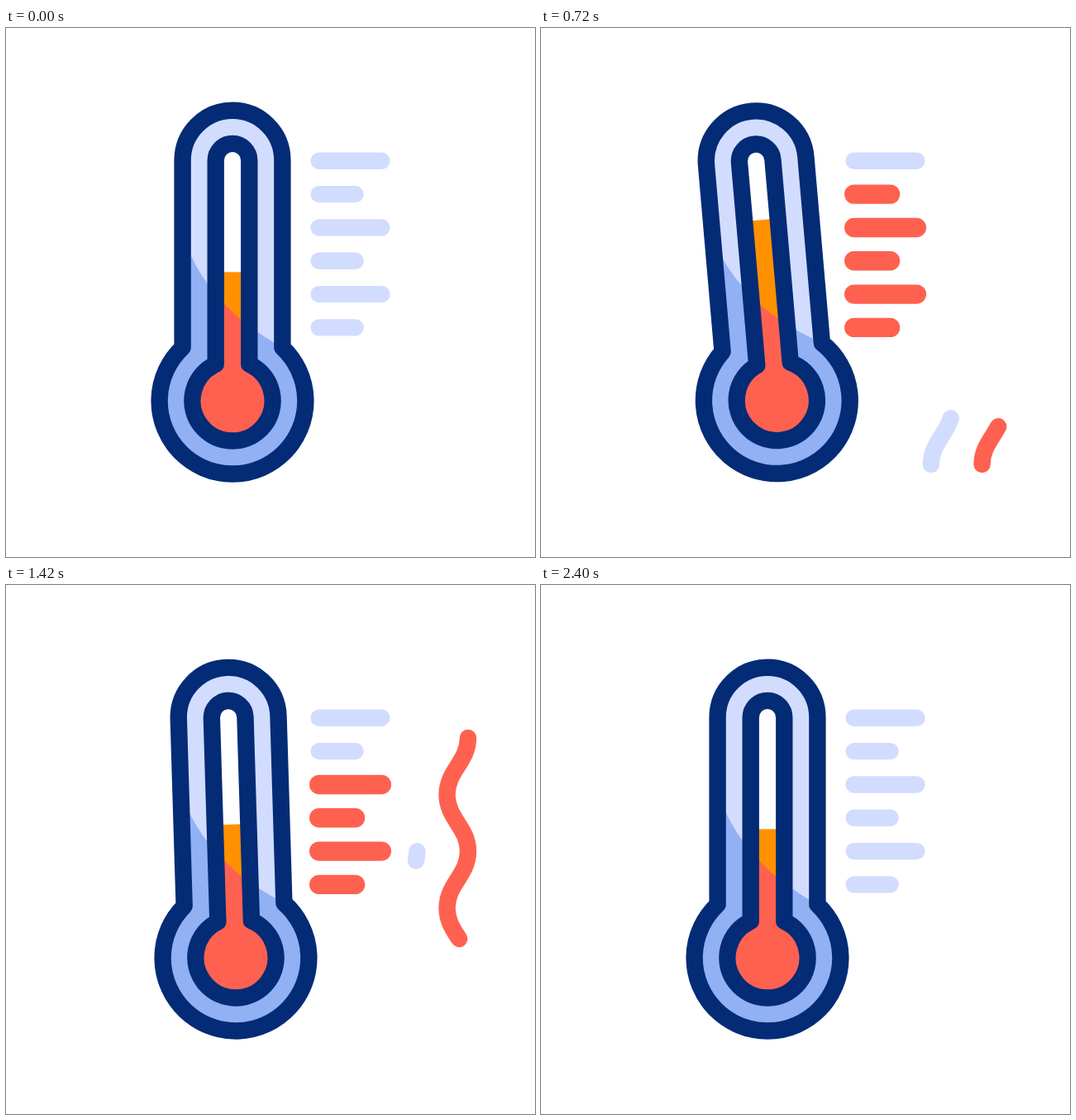
These frames come from a looping animation (640x640 px, 2.42 s). An HTML page:

```html
<!DOCTYPE html>
<html lang="en">
<head>
<meta charset="utf-8">
<title>Thermometer</title>
<style>
  html, body { margin: 0; width: 100%; height: 100%; overflow: hidden; background: #fff; }
  svg { display: block; width: 100%; height: 100%; }
  .line { fill: none; stroke-width: 20.4; stroke-linecap: round; stroke-linejoin: round; }
  .navy { stroke: #042b76; }
  .pale { stroke: #d2dcfe; }
  .red { stroke: #ff6150; }
  .bar.red { stroke-width: 23.4; }
</style>
</head>
<body>
<svg viewBox="0 0 640 640">
  <defs>
    <path id="case" d="M213.6 386.6V160.2a60.4 60.4 0 0 1 120.8 0V386.6A88.4 88.4 0 1 1 213.6 386.6Z"/>
    <path id="tube" d="M253.7 406.8V160.2a20.3 20.3 0 0 1 40.6 0V406.8A48.6 48.6 0 1 1 253.7 406.8Z"/>
    <path id="shade" d="M213 253L223 274Q254 340 325 381L400 424V560H150V253Z"/>
    <clipPath id="inCase"><use href="#case"/></clipPath>
    <clipPath id="inTube"><use href="#tube"/></clipPath>
  </defs>
  <g id="bars"></g>
  <g id="waves"></g>
  <g id="thermo">
    <g clip-path="url(#inCase)">
      <use href="#case" fill="#d2dcfe"/>
      <use href="#shade" fill="#92b0f4"/>
    </g>
    <use href="#case" class="line navy"/>
    <g clip-path="url(#inTube)">
      <use href="#tube" fill="#ff9100"/>
      <use href="#shade" fill="#ff6150"/>
      <rect id="empty" x="250" y="130" width="48" height="165" fill="#fff"/>
    </g>
    <use href="#tube" class="line navy"/>
  </g>
</svg>
<script>
  const LOOP = 2420;
  const $ = id => document.getElementById(id);

  function add(parent, tag, attrs) {
    const el = document.createElementNS('http://www.w3.org/2000/svg', tag);
    for (const k in attrs) el.setAttribute(k, attrs[k]);
    return parent.appendChild(el);
  }

  // Eased value at time t through [time, value] keys
  function track(keys, t) {
    if (t <= keys[0][0]) return keys[0][1];
    for (let i = 1; i < keys.length; i++) {
      const [t0, v0] = keys[i - 1], [t1, v1] = keys[i];
      if (t < t1) {
        const x = (t - t0) / (t1 - t0);
        return v0 + (v1 - v0) * x * x * (3 - 2 * x);
      }
    }
    return keys[keys.length - 1][1];
  }

  const tilt = [[20, 0], [560, -12.7], [930, 6.7], [1260, -3.2], [1600, 0]];
  const level = [[40, 295.3], [455, 335], [840, 201], [1220, 335.5], [1600, 250.5], [2160, 295.3]];

  // Scale bars, bottom to top; they light upwards and go out downwards
  const bars = [];
  for (let i = 0; i < 6; i++) {
    const y = 362.4 - 40.32 * i;
    const line = { x1: 378.7, x2: i % 2 ? 454.4 : 422.6, y1: y, y2: y };
    bars.push({ el: add($('bars'), 'line', line), on: 480 + 60 * i, off: 1620 - 60 * i });
  }

  function wave(x, turns, color, head, tail) {
    const half = 68.6;
    let d = `M${x} 528`;
    for (let i = 0; i < turns; i++) {
      const s = i % 2 ? -25.4 : 25.4;
      d += `c0 -29 ${s} ${29 - half} ${s} ${-half}`;
    }
    const el = add($('waves'), 'path', { d, class: 'line ' + color, pathLength: 1 });
    return { el, head: [[head[0], 0], [head[1], 1]], tail: [[tail[0], 0], [tail[1], 1]] };
  }

  const waves = [
    wave(472, 3, 'pale', [530, 1080], [945, 1495]),
    wave(533.6, 5, 'red', [530, 1350], [1110, 1980])
  ];

  function draw(now) {
    const t = now % LOOP;
    $('thermo').setAttribute('transform', `rotate(${track(tilt, t)} 274 320)`);
    $('empty').setAttribute('height', track(level, t) - 130);
    for (const b of bars) {
      b.el.setAttribute('class', 'line bar ' + (t >= b.on && t < b.off ? 'red' : 'pale'));
    }
    for (const w of waves) {
      const tail = track(w.tail, t), len = track(w.head, t) - tail;
      w.el.style.display = len > 0 ? '' : 'none';
      w.el.style.strokeDasharray = `${len} 3`;
      w.el.style.strokeDashoffset = -tail;
    }
  }

  let start;
  function tick(now) {
    start ??= now;
    draw(now - start);
    requestAnimationFrame(tick);
  }
  draw(0);
  requestAnimationFrame(tick);
</script>
</body>
</html>
```
